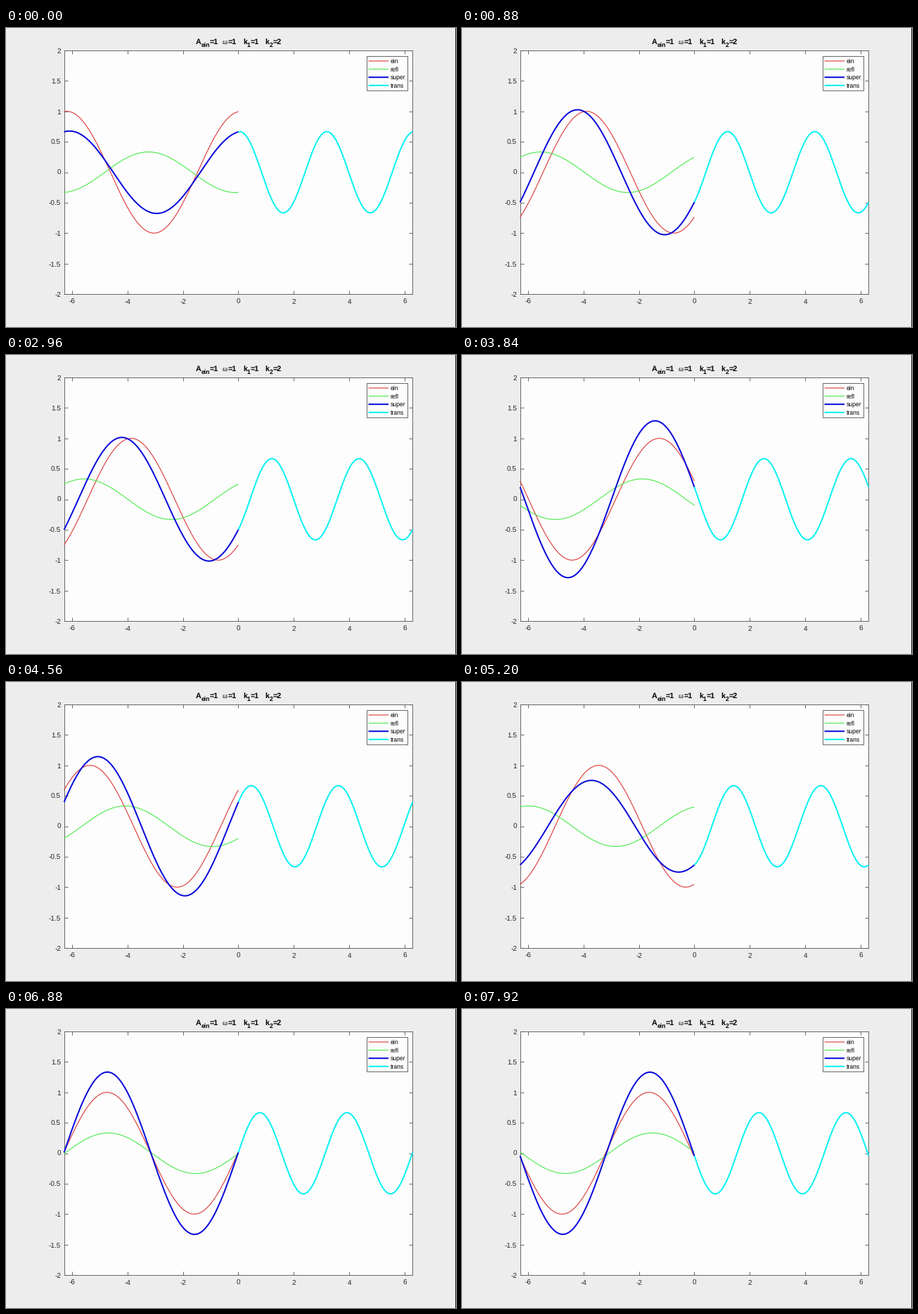
A matplotlib script for the animation above (8000 ms loop, 640 by 426 pixels).

```python
import math

import matplotlib.pyplot as plt
import numpy as np
from matplotlib.animation import FuncAnimation
from matplotlib.patches import Rectangle

plt.rcParams["text.hinting"] = "none"

W, H, DPI = 640, 426, 100
FRAMES, INTERVAL = 100, 80
PX = 72 / DPI  # points per pixel
LEFT, RIGHT, TOP, BOTTOM = 82.6, 578.3, 32.0, 379.0
INK, FRAME, PAPER = "#262626", "#5a5a5a", "#fdfdfd"
RED, GREEN, BLUE, CYAN = "#dc3434", "#48ea48", "#0808dc", "#08f2f2"
THIN, THICK = 1.1, 2.0

AMP, OMEGA, K1, K2 = 1.0, 1.0, 1.0, 2.0
REFL = AMP * (K1 - K2) / (K1 + K2)
TRANS = AMP * 2 * K1 / (K1 + K2)

fig = plt.figure(figsize=(W / DPI, H / DPI), dpi=DPI, facecolor="#ededed")
ax = fig.add_axes([0, 0, 1, 1])
ax.set_xlim(0, W)
ax.set_ylim(H, 0)
ax.axis("off")


def sx(x):
    return LEFT + (x + 2 * math.pi) * (RIGHT - LEFT) / (4 * math.pi)


def sy(y):
    return TOP + (2 - y) * (BOTTOM - TOP) / 4


def line(xs, ys, color=FRAME, width=0.9, z=2, **kw):
    return ax.plot(xs, ys, color=color, lw=width * PX, zorder=z,
                   solid_capstyle="butt", **kw)[0]


def label(x, y, text, size, **kw):
    kw = {"family": "Liberation Sans", "color": INK, "va": "baseline", **kw}
    ax.text(x, y, text, fontsize=size * PX, zorder=8, **kw)


def box(x0, y0, x1, y1, z):
    ax.add_patch(Rectangle((x0, y0), x1 - x0, y1 - y0, facecolor=PAPER,
                           edgecolor=FRAME, lw=0.9 * PX, zorder=z))


# Plot box with inward ticks on all four sides
box(LEFT, TOP, RIGHT, BOTTOM, 1)
for v in range(-6, 7, 2):
    x = sx(v)
    line([x, x], [BOTTOM, BOTTOM - 5])
    line([x, x], [TOP, TOP + 5])
    label(x, 392.6, str(v), 10, ha="center")
for v in np.arange(-2, 2.1, 0.5):
    y = sy(v)
    line([LEFT, LEFT + 5], [y, y])
    line([RIGHT, RIGHT - 5], [y, y])
    label(78, y + 3.8, f"{v:g}", 10, ha="right")

# Title: main runs and subscripts
for x, text in ((269.8, "A"), (290, "=1"), (315.2, "=1"), (336.8, "k"),
                (347.8, "=1"), (368.4, "k"), (379.4, "=2")):
    label(x, 23, text, 10.8, weight="bold", color="black")
for x, text in ((277.6, "ein"), (342.8, "1"), (374.4, "2")):
    label(x, 27.2, text, 8.7, weight="bold", color="black")
label(307.6, 23, "ω", 10.8, family="Liberation Serif", color="black")

# Legend
box(513.2, 39.5, 571.2, 88.5, 6)
for i, (name, color, width) in enumerate((("ein", RED, THIN), ("refl", GREEN, THIN),
                                          ("super", BLUE, THICK), ("trans", CYAN, THICK))):
    y = 47 + 11.6 * i
    line([515.5, 544], [y, y], color, width, 7, snap=False)
    label(546.8, y + 3, name, 8.7, color="black")

# Dark rim at the right edge of the stage
ax.add_patch(Rectangle((W - 1, 0), 1, H, facecolor="#202020", lw=0))

xl = np.linspace(-2 * math.pi, 0, 300)
xr = np.linspace(0, 2 * math.pi, 300)
ein = line(sx(xl), sy(0 * xl), RED, THIN, 3)
refl = line(sx(xl), sy(0 * xl), GREEN, THIN, 3.1)
total = line(sx(xl), sy(0 * xl), BLUE, THICK, 3.2)
trans = line(sx(xr), sy(0 * xr), CYAN, THICK, 3.3)


def update(n):
    # Time runs in steps of 0.1, 2.4 steps per frame after a short hold
    t = 0.1 * max(1, math.floor(2.4 * n - 1.7))
    a = AMP * np.cos(K1 * xl - OMEGA * t)
    b = REFL * np.cos(K1 * xl + OMEGA * t)
    ein.set_ydata(sy(a))
    refl.set_ydata(sy(b))
    total.set_ydata(sy(a + b))
    trans.set_ydata(sy(TRANS * np.cos(K2 * xr - OMEGA * t)))
    return ein, refl, total, trans


anim = FuncAnimation(fig, update, frames=FRAMES, interval=INTERVAL,
                     repeat=True, repeat_delay=0, blit=False)
plt.show()
```
